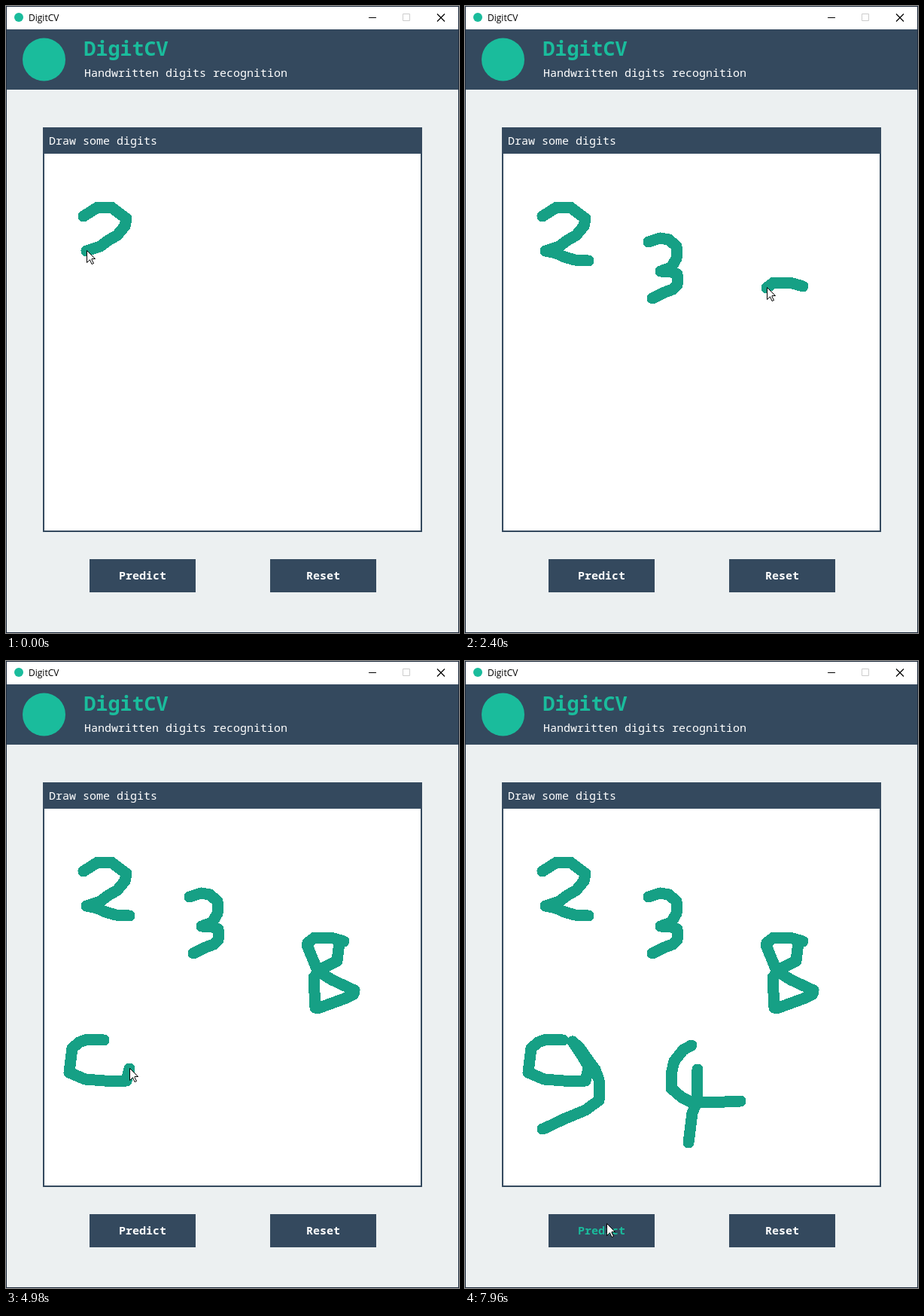
An HTML page that plays this animation: 602x832 px, repeating every 8 s.

```html
<!DOCTYPE html>
<html lang="en">
<head>
<meta charset="utf-8">
<title>DigitCV</title>
<style>
  html, body { margin: 0; width: 100%; height: 100%; overflow: hidden; background: #ecf0f1; }
  svg { display: block; width: 100%; height: 100%; }
  text { font: 15px "Noto Sans Mono", "DejaVu Sans Mono", monospace; fill: #fff; white-space: pre; }
  .caption { font: 12px "Open Sans", "Noto Sans", sans-serif; fill: #000; }
  .title { font-size: 26.67px; font-weight: 700; fill: #1abc9c; }
  .button { font-weight: 700; text-anchor: middle; }
  .button.hover { fill: #1abc9c; }
  .panel { fill: #34495e; }
  .logo { fill: #1abc9c; }
  .line { fill: none; stroke: #000; }
  #ink { fill: none; stroke: #16a085; stroke-width: 15; stroke-linecap: round; stroke-linejoin: round; shape-rendering: crispEdges; }
  #cursor { fill: #fff; stroke: #000; }
</style>
</head>
<body>
<svg viewBox="0 0 602 832">
  <rect width="602" height="832" fill="#ecf0f1"/>

  <rect width="602" height="31" fill="#fff"/>
  <circle class="logo" cx="17" cy="15" r="6"/>
  <text class="caption" x="30" y="20">DigitCV</text>
  <path class="line" d="M482 15.5h10"/>
  <path class="line" d="M527.5 10.5h9v9h-9z" style="stroke:#ccc"/>
  <path class="line" d="M573 10.5l10 10m0-10l-10 10" style="stroke-width:1.2"/>

  <rect class="panel" y="31" width="602" height="80"/>
  <circle class="logo" cx="50.5" cy="71" r="28.5"/>
  <text class="title" x="103.5" y="66">DigitCV</text>
  <text x="104" y="94">Handwritten digits recognition</text>

  <rect class="panel" x="49" y="161" width="504" height="537"/>
  <rect x="51" y="196" width="500" height="500" fill="#fff"/>
  <text x="57" y="184">Draw some digits</text>

  <rect class="panel" x="111" y="734" width="141" height="44"/>
  <text class="button" id="predict" x="181.5" y="761">Predict</text>
  <rect class="panel" x="351" y="734" width="141" height="44"/>
  <text class="button" x="421.5" y="761">Reset</text>

  <rect class="line" x=".5" y=".5" width="601" height="831" style="stroke:#1c2a3c"/>

  <path id="ink"/>
  <path id="cursor" d="M.5 .5V16.5L4.5 12.8 7 18.5 9.5 17.5 7 12.5V11.5H11.5Z"/>
</svg>
<script>
  // One string per mouse update: M moves with the pen up, L draws.
  const two = [
    'M103 279L122 267 140 267 160 282 158 292 148 304 136 311 125 319 107 325',
    'L121 328 132 333', 'L146 337', 'L164 338',
    'M172 337', 'M190 334', 'M212 329', 'M231 324'
  ];
  const three = [
    'M244 313', 'L259 308 271 310', 'L281 319', 'L281 335 274 347', 'L260 352',
    'L275 353 282 356 282 367', 'L282 370 276 376 265 380', 'L249 388',
    'M300 388', 'M380 380'
  ];
  const eight = [
    'M449 372', 'L432 367', 'L410 367 401 374', 'L400 377 414 411', 'L433 423',
    'L463 437 462 442', 'L450 448 436 453', 'L414 461', 'L411 460 409 420',
    'L418 409', 'L440 398', 'L443 373',
    'M415 385', 'M350 420', 'M265 462', 'M199 487', 'M150 495'
  ];
  const nine = [
    'M130 503', 'L108 502 97 506', 'L88 514', 'L84 546', 'L105 555', 'L131 557',
    'L160 557 164 541', 'L163 536 155 523', 'L143 505', 'L152 513 166 533',
    'L173 542 178 556', 'L178 583', 'L160 596 131 608', 'L106 620', 'L103 621',
    'M130 608', 'M215 550'
  ];
  const four = [
    'M301 510', 'L290 516 278 531', 'L274 548', 'L274 567 288 579',
    'L300 585 345 585', 'L366 584', 'M341 564',
    'M309 542', 'L308 585', 'L302 600 297 639',
    'M250 690', 'M200 738', 'M188 747'
  ];

  const LOOP = 8000;
  const longHolds = { 26: 150, 33: 150, 41: 150, 49: 150, 58: 150, 61: 250 };
  let start = 0, d = '';
  const steps = [...two, ...three, ...eight, ...nine, ...four].map((part, i) => {
    const [x, y] = part.match(/\d+/g).slice(-2).map(Number);
    const step = { start, x, y, d: d += part };
    start += longHolds[i] || 120;
    return step;
  });

  const [ink, cursor, predict] = ['ink', 'cursor', 'predict'].map(id => document.getElementById(id));
  let shown;

  function render(now) {
    const t = now % LOOP;
    const step = steps.findLast(s => s.start <= t);
    if (step !== shown) {
      const { x, y } = shown = step;
      ink.setAttribute('d', step.d);
      cursor.setAttribute('transform', `translate(${x} ${y - 1})`);
      predict.classList.toggle('hover', x >= 111 && x < 252 && y >= 734 && y < 778);
    }
  }

  const origin = performance.now();
  function tick() {
    render(performance.now() - origin);
    requestAnimationFrame(tick);
  }
  tick();
</script>
</body>
</html>
```
